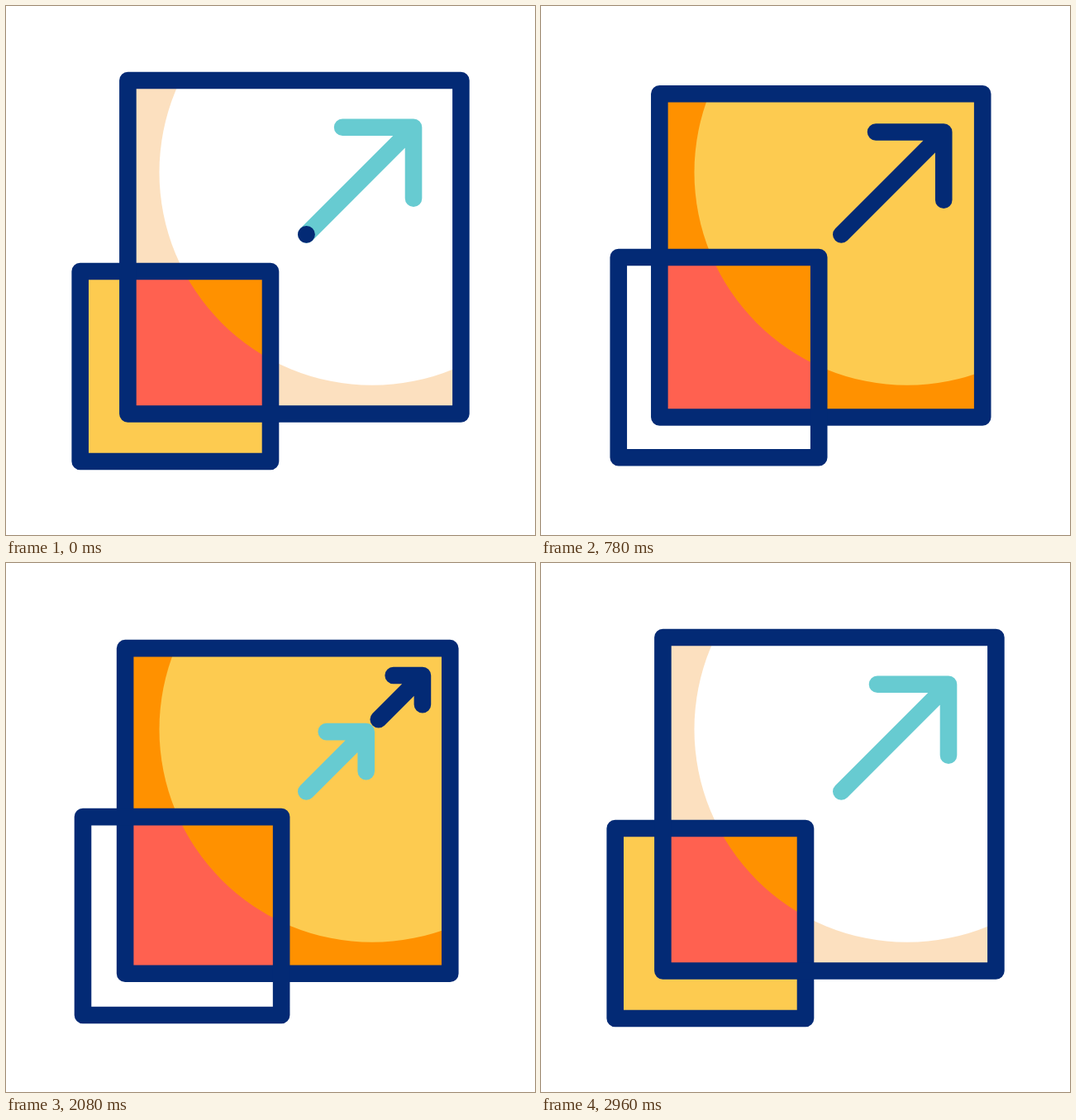
An HTML page with a canvas that plays this animation: 640x640 px, repeating every 3.6 s.

```html
<!DOCTYPE html>
<html lang="en">
<head>
<meta charset="utf-8">
<title>Scale icon</title>
<style>
  html, body { margin: 0; height: 100%; overflow: hidden; background: #fff; }
  canvas { display: block; }
</style>
</head>
<body>
<canvas id="stage" width="640" height="640"></canvas>
<script>
const ctx = document.getElementById('stage').getContext('2d');
const NAVY = '#032a75', TEAL = '#67cbd1', YELLOW = '#fdcb50', ORANGE = '#ff9100',
      RED = '#ff6150', PEACH = '#fce0bf', WHITE = '#fff';

const LOOP = 3600, RETURN = 1780, ARROW_TIME = 1080;
const TAIL = [363.3, 276.5], VANISH = [511.5, 128.5];

// Squares as [left, top, right, bottom] of the stroke's centre line
const BIG = [147.4, 90, 550.4, 493.5];
const SMALL_YELLOW = [89.7, 321, 320, 551];
const SMALL_WHITE = [89.7, 320.2, 320, 550.2];

const mix = (a, b, k) => a.map((v, i) => v + (b[i] - v) * k);

function bezier(x1, y1, x2, y2) {
  const curve = (a, b, u) => 3 * a * u * (1 - u) ** 2 + 3 * b * u * u * (1 - u) + u ** 3;
  return t => {
    if (t <= 0) return 0;
    if (t >= 1) return 1;
    let lo = 0, hi = 1;
    for (let i = 0; i < 30; i++) {
      const mid = (lo + hi) / 2;
      if (curve(x1, x2, mid) < t) lo = mid; else hi = mid;
    }
    return curve(y1, y2, lo);
  };
}
const squareEase = bezier(.75, 0, .25, 1);
const arrowEase = bezier(.167, .167, .25, 1);

function squarePath([l, t, r, b]) {
  ctx.beginPath();
  ctx.rect(l, t, r - l, b - t);
}

// Fill the current clip, with a second colour inside the big circle
function shade(outside, inside) {
  ctx.fillStyle = outside;
  ctx.fillRect(0, 0, 640, 640);
  ctx.fillStyle = inside;
  ctx.beginPath();
  ctx.arc(443, 201.3, 257.5, 0, 2 * Math.PI);
  ctx.fill();
}

function clipped(squares, paint) {
  ctx.save();
  for (const square of squares) {
    squarePath(square);
    ctx.clip();
  }
  paint();
  ctx.restore();
}

function drawSquares(k) {
  const yellow = mix(SMALL_YELLOW, BIG, k), white = mix(BIG, SMALL_WHITE, k);
  const yellowIsLarger = k > .5;
  clipped([white], () => shade(yellowIsLarger ? WHITE : PEACH, WHITE));
  clipped([yellow], () => shade(yellowIsLarger ? ORANGE : YELLOW, YELLOW));
  clipped([yellow, white], () => shade(RED, ORANGE));
  ctx.strokeStyle = NAVY;
  for (const square of [yellow, white]) {
    squarePath(square);
    ctx.stroke();
  }
}

function drawArrow(color, anchor, scale) {
  if (scale <= 0) return;
  const at = (x, y) => mix(anchor, [x, y], scale);
  const corner = at(493, 146.8);
  ctx.strokeStyle = color;
  ctx.beginPath();
  ctx.moveTo(...at(407, 146.8));
  ctx.lineTo(...corner);
  ctx.lineTo(...at(493, 232.8));
  ctx.moveTo(...at(...TAIL));
  ctx.lineTo(...corner);
  ctx.stroke();
}

function draw() {
  const time = performance.now() % LOOP;
  const back = time >= RETURN;
  const elapsed = back ? time - RETURN : time;
  const k = squareEase(elapsed / (back ? 1180 : 1080));
  const p = arrowEase(elapsed / ARROW_TIME);

  ctx.fillStyle = WHITE;
  ctx.fillRect(0, 0, 640, 640);
  ctx.lineWidth = 20.6;
  ctx.lineCap = ctx.lineJoin = 'round';
  drawSquares(back ? 1 - k : k);

  const entering = [TAIL, Math.max(p, .002)];
  const leaving = [VANISH, 1 - 1.057 * p];
  // At the start of a swap the leaving arrow rests at its full pose
  drawArrow(TEAL, ...(back ? entering : leaving));
  drawArrow(NAVY, ...(back ? leaving : entering));
  requestAnimationFrame(draw);
}
draw();
</script>
</body>
</html>
```
